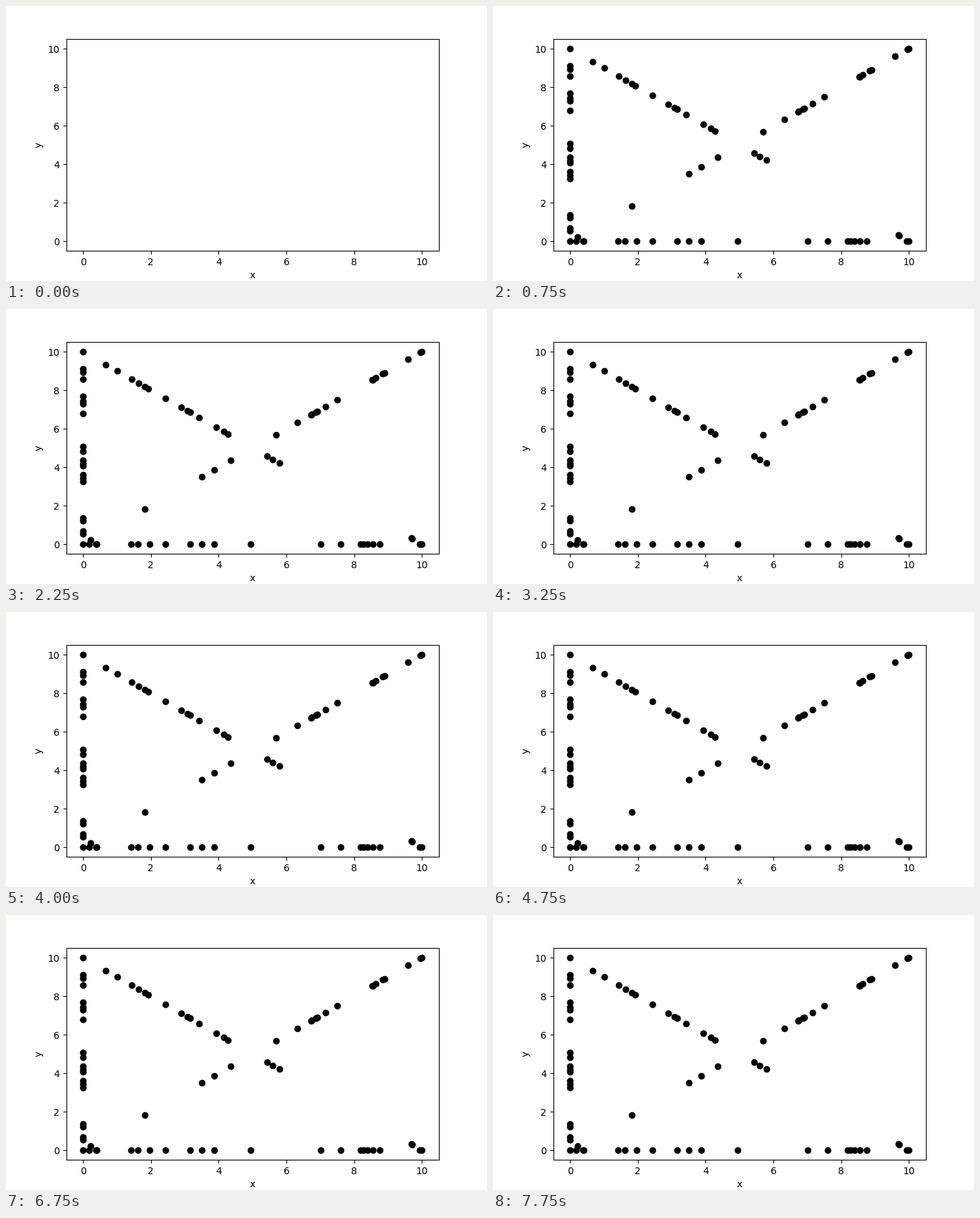
A matplotlib script for the animation above (8 s loop, 700x400 px).

```python
import numpy as np
import matplotlib.pyplot as plt
from matplotlib.animation import FuncAnimation

FRAMES, INTERVAL = 32, 250

# Points lie on four lines: both axes and both diagonals of a 10 x 10 square.
LEFT = [0, 0.53, 0.67, 1.22, 1.35, 3.26, 3.43, 3.6, 4.07, 4.18, 4.36, 4.82,
        5.07, 6.79, 7.28, 7.43, 7.67, 8.57, 8.93, 9.1, 10]
BOTTOM = [0.17, 0.38, 0.4, 1.42, 1.62, 1.97, 2.43, 3.16, 3.5, 3.87, 4.95,
          7.02, 7.6, 8.18, 8.27, 8.39, 8.55, 8.76, 9.94, 10]
RISING = [0.22, 1.82, 3.5, 3.87, 4.36, 5.69, 6.33, 6.73, 6.75, 6.87, 6.91,
          7.15, 7.5, 8.53, 8.55, 8.63, 8.84, 8.9, 9.59, 9.95, 10]
FALLING = [0.67, 1.01, 1.44, 1.64, 1.82, 1.92, 2.43, 2.9, 3.08, 3.16, 3.42,
           3.93, 4.15, 4.28, 5.43, 5.59, 5.8, 9.69, 9.71]


def line(values, x_of, y_of):
    t = np.array(values, dtype=float)
    return np.column_stack([x_of(t), y_of(t)])


def zero(t):
    return 0 * t


def same(t):
    return t


points = np.vstack([
    line(LEFT, zero, same),
    line(BOTTOM, same, zero),
    line(RISING, same, same),
    line(FALLING, same, lambda t: 10 - t),
])

fig, ax = plt.subplots(figsize=(7, 4), dpi=100)
ax.set(xlim=(-0.5, 10.5), ylim=(-0.5, 10.5), xlabel="x", ylabel="y")
dots, = ax.plot([], [], "o", color="black", markersize=6)


def update(i):
    # The plot starts empty, then all points appear at once and stay.
    shown = points if i > 0 else points[:0]
    dots.set_data(shown[:, 0], shown[:, 1])
    return dots,


anim = FuncAnimation(fig, update, frames=FRAMES, interval=INTERVAL,
                     init_func=lambda: update(0), repeat=True, repeat_delay=0)
plt.show()
```
